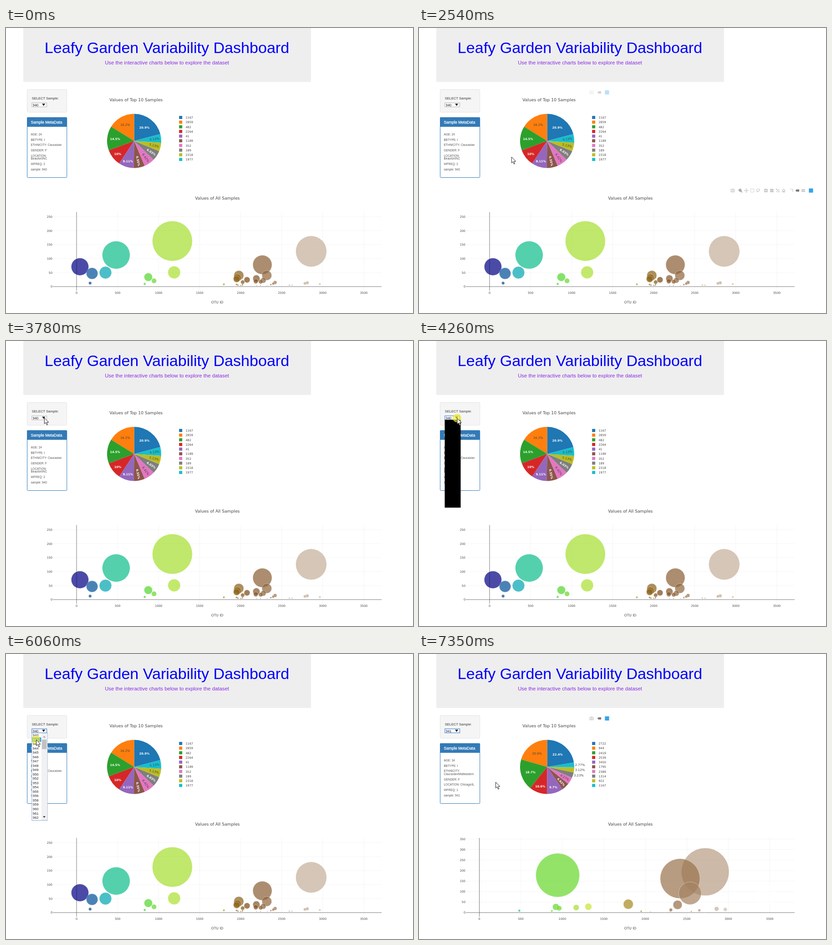
Recreate the animation shown at these times as an HTML page. Size 894x626 px, loop 8000 ms.

```html
<!DOCTYPE html>
<html lang="en">
<head>
<meta charset="utf-8">
<title>Dashboard</title>
<style>
  html, body { margin: 0; width: 100%; height: 100%; overflow: hidden; background: #fff; }
  svg { display: block; width: 894px; height: 626px; font-family: "Liberation Sans", Arial, sans-serif; }
  .plot { font-family: "DejaVu Sans", Verdana, sans-serif; fill: #444; }
</style>
</head>
<body>
<svg id="stage" viewBox="0 0 894 626" xmlns="http://www.w3.org/2000/svg"></svg>
<script>
const LOOP = 8000;
const COLORS = ['#1f77b4', '#ff7f0e', '#2ca02c', '#d62728', '#9467bd',
                '#8c564b', '#e377c2', '#7f7f7f', '#bcbd22', '#17becf'];
const DARK_LABELS = ['#ff7f0e', '#e377c2', '#bcbd22', '#17becf'];
const EARTH = [[0, 0, 0, 130], [.1, 0, 180, 180], [.2, 40, 210, 40],
               [.4, 230, 230, 50], [.6, 120, 70, 20], [1, 255, 255, 255]];

// top: OTU id and value of the ten largest; minor: further ids whose values decay by a fixed ratio
const SAMPLES = [
  {
    id: 940, x0: 155, kx: .18026, ky: .614, yMax: 250,
    meta: ['AGE: 24', 'BBTYPE: I', 'ETHNICITY: Caucasian', 'GENDER: F',
           'LOCATION:\nBeaufort/NC', 'WFREQ: 2', 'sample: 940'],
    top: [[1167, 163], [2859, 126], [482, 113], [2264, 78], [41, 71],
          [1189, 51], [352, 50], [189, 47], [2318, 40], [1977, 40]],
    minor: [874, 1959, 2191, 1950, 2077, 2275, 944, 2184, 2244, 2024,
            2419, 2811, 165, 2782, 2396, 830, 2964, 1795],
    largestMinor: 34, decay: .92
  },
  {
    id: 941, x0: 132.5, kx: .18229, ky: .4614, yMax: 350,
    meta: ['AGE: 34', 'BBTYPE: I', 'ETHNICITY:\nCaucasian/Midleastern', 'GENDER: F',
           'LOCATION: Chicago/IL', 'WFREQ: 1', 'sample: 941'],
    top: [[2722, 194], [944, 178], [2419, 162], [2539, 92], [3450, 84],
          [1795, 40], [2389, 37], [1314, 28], [922, 27], [1167, 24]],
    minor: [962, 2859, 2964, 2308, 2651, 482, 874],
    largestMinor: 21, decay: .85
  }
];
const MISSING_IDS = [942, 951, 957];
const OPTIONS = Array.from({ length: 23 }, (_, i) => 940 + i).filter(id => !MISSING_IDS.includes(id));
const ROW = 9.53;

// time, x, y of the pointer tip
const POINTER = [
  [1390, 600, 592], [1760, 522, 490], [1930, 522, 490], [2540, 203, 283], [3240, 110, 172],
  [3600, 84, 168], [5050, 83, 171], [5430, 66, 188], [6670, 66, 188], [6900, 143, 251], [7210, 168, 281]
];

const text = (x, y, s, size, attrs = '') => `<text x="${x}" y="${y}" font-size="${size}" ${attrs}>${s}</text>`;
const rect = (x, y, w, h, fill, attrs = '') =>
  `<rect x="${x}" y="${y}" width="${w}" height="${h}" fill="${fill}" ${attrs}/>`;
const path = (d, attrs = '') => `<path d="${d}" ${attrs}/>`;
const group = (id, body, attrs = '') => `<g id="${id}" ${attrs}>${body}</g>`;
const MID = 'text-anchor="middle"';

function random(seed) {
  return () => (seed = seed * 16807 % 2147483647) / 2147483647;
}

function earth(otu) {
  const t = Math.min(1, (otu - 41) / 3409);
  const i = Math.max(1, EARTH.findIndex(s => s[0] >= t));
  const a = EARTH[i - 1], b = EARTH[i], k = (t - a[0]) / (b[0] - a[0]);
  return `rgb(${[1, 2, 3].map(c => Math.round(a[c] + (b[c] - a[c]) * k))})`;
}

function pie({ top }) {
  const cx = 281.5, cy = 248, r = 59.5;
  const total = top.reduce((sum, [, n]) => sum + n, 0);
  const angle = n => -Math.PI / 2 - n / total * 2 * Math.PI;
  const at = (a, d) => [cx + d * Math.cos(a), cy + d * Math.sin(a)];
  let from = -top[0][1], slices = '', labels = '', legend = '';
  top.forEach(([otu, n], i) => {
    const mid = angle(from + n / 2), pct = +(n / total * 100).toPrecision(3);
    slices += path(`M${cx} ${cy}L${at(angle(from), r)}A${r} ${r} 0 0 0 ${at(angle(from + n), r)}Z`,
      `fill="${COLORS[i]}"`);
    from += n;

    // wide slices carry level text, narrow ones radial text, the thinnest are labelled outside
    const outside = pct < 3.5, radial = !outside && pct < 9;
    const [x, y] = at(mid, outside ? r + 2 : radial ? 45 : 54.5 - .85 * pct);
    const dark = outside || DARK_LABELS.includes(COLORS[i]);
    labels += text(x, y + 2.4, pct + '%', dark ? 6.8 : 6.4, (outside ? '' : MID) +
      (radial ? ` transform="rotate(${mid * 180 / Math.PI} ${x} ${y})"` : '') +
      (dark ? '' : ' fill="#fff" font-weight="bold"'));

    const ly = 196.5 + 10.25 * i;
    legend += rect(380.2, ly - 3.4, 6.9, 6.8, COLORS[i]) + text(394.5, ly + 2.5, otu, 6.48);
  });
  return slices + labels + legend;
}

function bubbles({ id, top, minor, largestMinor, decay }) {
  const next = random(id);
  const scattered = Array.from({ length: 14 }, () => Math.round(1950 + 1000 * next() ** 2));
  return top.concat([...minor, ...scattered].map((otu, i) => [otu, largestMinor * decay ** i]));
}

function bubbleChart(sample) {
  const { x0, kx, ky, yMax } = sample, base = 568;
  const line = (d, zero) => path(d, `stroke="${zero ? '#555' : '#eee'}" stroke-width="${zero ? .8 : .6}"`);
  let grid = '', axes = '', ticks = '';
  for (let v = 0; v <= 3500; v += 500) {
    const x = x0 + v * kx, d = `M${x} 404V577`;
    v ? grid += line(d) : axes += line(d, true);
    ticks += text(x, 584, v, 6.48, MID);
  }
  for (let v = 0; v <= yMax; v += 50) {
    const y = base - v * ky, d = `M103 ${y}H825`;
    v ? grid += line(d) : axes += line(d, true);
    ticks += text(102, y + 2.4, v, 6.48, 'text-anchor="end"');
  }
  const dots = bubbles(sample).map(([otu, n]) =>
    `<circle cx="${x0 + otu * kx}" cy="${base - n * ky}" r="${n * .27}" fill="${earth(otu)}"
      stroke="#fff" stroke-width=".54" opacity=".7"/>`).join('');
  return grid + axes + dots + ticks;
}

// toolbar icons, drawn around 0,0
const ICON = {
  camera: 'M-4-2.5H-2L-1-3.7H1L2-2.5H4V3.3H-4ZM-1.8.4A1.8 1.8 0 1 0 1.8.4A1.8 1.8 0 1 0-1.8.4',
  zoom: 'M-3.3-.8A2.5 2.5 0 1 0 1.7-.8A2.5 2.5 0 1 0-3.3-.8M1 1.2L3.8 4M-2-.8H.4M-.8-2V.4',
  pan: 'M-4 0H4M0-4V4M-1-3L0-4L1-3M-1 3L0 4L1 3M-3-1L-4 0L-3 1M3-1L4 0L3 1',
  box: 'M-3.7-3.4H3.7V3.4H-3.7Z',
  lasso: 'M-2 1.5C-6-1-2-4 1-3.4C5-2.5 4 1.5-1 1.6C-3 2-2 3-2.5 4',
  plus: 'M-3.5-3.5H3.5V3.5H-3.5Z',
  minus: 'M-3.5-3.5H3.5V3.5H-3.5Z',
  auto: 'M-3.5-3.5L3.5 3.5M3.5-3.5L-3.5 3.5M-3.5-1.6V-3.5H-1.6M3.5 1.6V3.5H1.6',
  home: 'M-3.8.3L0-3.5L3.8.3M-2.4.2V3.4H-.7V1H.7V3.4H2.4V.2',
  spike: 'M-3-3H3V3M-1-3L-2-3',
  tag: 'M-4 0L-1.8-2.2H4V2.2H-1.8Z',
  pair: 'M-3.8-2.8H3.8V-.6H-3.8ZM-3.8.7H3.8V2.9H-3.8Z'
};
const SOLID = ['tag', 'pair', 'plus', 'minus'];
const SIGN = { plus: 'M-2 0H2M0-2V2', minus: 'M-2 0H2' };

function icon(name) {
  if (name === 'badge') return rect(-4.6, -4.6, 9.2, 9.2, '#35a5e8');
  const color = ['zoom', 'tag'].includes(name) ? '#777' : '#c4c4c4', solid = SOLID.includes(name);
  return path(ICON[name], `fill="${solid ? color : 'none'}" stroke="${color}" stroke-width="${solid ? .3 : 1.1}"
    ${name === 'box' ? 'stroke-dasharray="1.5 .9"' : ''}`) + path(SIGN[name] || '', 'stroke="#fff"');
}
function toolbar(id, x, y, names) {
  let body = '';
  for (const section of names.split('|')) {
    for (const name of section.split(' ')) {
      body += `<g transform="translate(${x} ${y})">${icon(name)}</g>`;
      x += 13;
    }
    x += 4;
  }
  return group(id, body);
}

const header = rect(38, -8, 632, 126.6, '#eee', 'rx="3.2"') +
  text(353.5, 55, 'Leafy Garden Variability Dashboard', 34.1, `${MID} fill="#00f"`) +
  text(353.5, 80, 'Use the interactive charts below to explore the dataset', 11.34, `${MID} fill="#8a2be2"`);

const sidebar = rect(46.5, 135, 87.2, 50, '#f5f5f5', 'stroke="#ddd" stroke-width=".8" rx="2"') +
  text(56.7, 157, 'SELECT Sample:', 7.56, 'fill="#333"') +
  rect(46.5, 196.5, 87.2, 132, '#fff', 'stroke="#337ab7" rx="2"') +
  path('M46 217V198Q46 196 48 196H132Q134 196 134 198V217Z', 'fill="#337ab7"') +
  text(54.5, 209.8, 'Sample MetaData', 8.64, 'fill="#fff" stroke="#fff" stroke-width=".25"');

const selectBox = rect(56.8, 164.4, 32.8, 8.8, '#fff', 'id="selectFrame"') +
  text(58.7, 171.6, '', 7.56, 'id="selected" fill="#112"') +
  path('M79.3 166.3H86L82.65 171.3Z', 'fill="#111"');

const menu = rect(56.8, 173.5, 34.2, 192, '#fff', 'stroke="#7d9fd6" stroke-width=".9"') +
  rect(57.3, 173.8, 20, ROW, '#1e90ff', 'id="hover"') +
  OPTIONS.map((o, i) => text(58.8, 181 + i * ROW, o, 7.56, 'class="option"')).join('') +
  rect(77.8, 174, 12.8, 191, '#f1f1f1') + rect(78.8, 188, 10.4, 21, '#c1c1c1') +
  path('M81 183.5H87L84 180Z', 'fill="#a3a3a3"') + path('M81 356.3H87L84 359.8Z', 'fill="#333"');

function metadata({ meta }) {
  let y = 224;
  return meta.map(item => item.split('\n').map((line, wrapped) => {
    y += wrapped ? 6.5 : 11.75;
    return text(54.5, y, line, 6.48, 'fill="#555"');
  }).join('')).join('');
}

document.getElementById('stage').innerHTML = header + sidebar +
  SAMPLES.map((s, i) => group('meta' + i, metadata(s)) +
    group('charts' + i, pie(s) + bubbleChart(s), 'class="plot"')).join('') +
  `<g class="plot">${text(285.7, 161.2, 'Values of Top 10 Samples', 9.18, MID)}${
    text(464.3, 377.3, 'Values of All Samples', 9.18, MID)}${text(464, 605, 'OTU ID', 7.56, MID)}</g>` +
  toolbar('pieBar', 379, 141.5, 'camera|tag|badge') +
  toolbar('bubbleBar', 689, 357, 'camera|zoom pan box lasso|plus minus auto home|spike tag pair|badge') +
  selectBox + group('menu', menu) +
  rect(56.5, 173, 35, 193, '#000', 'id="blank"') +
  '<circle id="click" r="9.5" fill="#f5ec28" opacity=".68"/>' +
  path('M0 0V13L3 10.2L5.3 15.6L7.3 14.7L5.1 9.6H9.3Z',
    'id="pointer" fill="#fff" stroke="#111" stroke-width=".9" stroke-linejoin="round"');

const $ = id => document.getElementById(id);
const options = document.querySelectorAll('.option');
const show = (id, on) => $(id).setAttribute('display', on ? 'inline' : 'none');
const ramp = (t, from, to) => Math.min(1, Math.max(0, (t - from) / (to - from)));
const within = (t, from, to) => t >= from && t < to;

function pointerAt(t) {
  const i = POINTER.findIndex(p => p[0] > t);
  if (i < 0) return POINTER[POINTER.length - 1].slice(1);
  const a = POINTER[Math.max(0, i - 1)], b = POINTER[i], k = ramp(t, a[0], b[0]);
  return [a[1] + (b[1] - a[1]) * k, a[2] + (b[2] - a[2]) * k];
}

function render(t) {
  const picked = t >= 6440, loaded = t >= 6510, redrawn = t >= 7210, focused = t >= 4190;
  [0, 1].forEach(i => {
    show('meta' + i, loaded === !!i);
    show('charts' + i, redrawn === !!i);
  });
  $('selected').textContent = SAMPLES[+picked].id;
  $('selectFrame').setAttribute('stroke', focused ? '#3f7fd0' : '#999');
  $('selectFrame').setAttribute('stroke-width', focused ? 1.1 : .7);

  show('blank', within(t, 4260, 4330));
  show('menu', within(t, 4330, 6440));
  const row = t < 5350 ? 0 : 1;
  $('hover').setAttribute('y', 173.8 + row * ROW);
  options.forEach((o, i) => o.setAttribute('fill', i === row ? '#fff' : '#222'));

  $('bubbleBar').setAttribute('opacity', ramp(t, 1400, 1700) - ramp(t, 2550, 2710));
  $('pieBar').setAttribute('opacity', ramp(t, 2440, 2740) - ramp(t, 2770, 3060) + ramp(t, 6930, 7230));

  const [x, y] = pointerAt(t);
  show('pointer', t >= 1390);
  $('pointer').setAttribute('transform', `translate(${x + .5} ${y + .5})`);
  show('click', within(t, 4190, 4330) || within(t, 6060, 6440));
  $('click').setAttribute('cx', x);
  $('click').setAttribute('cy', y);
}

const start = performance.now();
function tick() {
  render((performance.now() - start) % LOOP);
  requestAnimationFrame(tick);
}
render(0);
requestAnimationFrame(tick);
</script>
</body>
</html>
```
